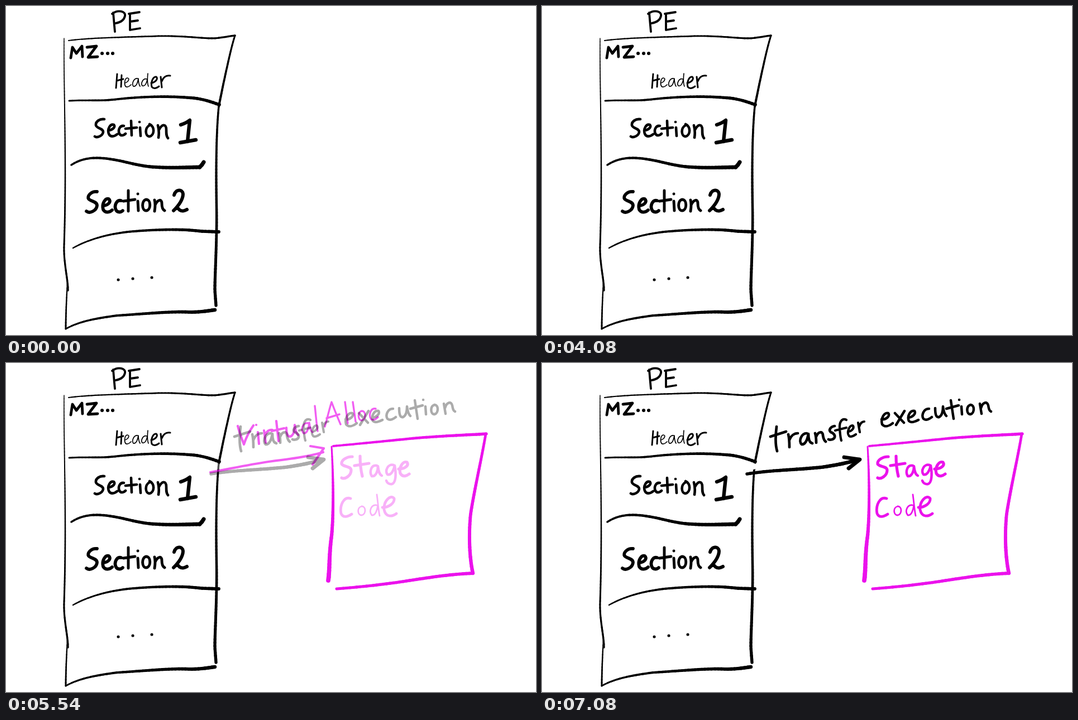
Recreate the animation shown at these times as an HTML page. Size 949 by 590 pixels, loop 7.12 s.

```html
<!DOCTYPE html>
<html lang="en">
<head>
<meta charset="utf-8">
<title>PE stage loading</title>
<style>
html, body { margin: 0; width: 100%; height: 100%; overflow: hidden; background: #fff; }
svg { display: block; width: 949px; height: 590px; }
path, line { fill: none; stroke-linecap: round; stroke-linejoin: round; }
g { stroke: #000; }
.pink { stroke: #eb12ec; }
.gap { stroke: #fff; }
</style>
</head>
<body>
<svg viewBox="0 0 949 590">
  <g id="file"></g>
  <g id="box" class="pink"></g>
  <g id="alloc" class="pink"></g>
  <g id="gap" class="gap"></g>
  <g id="run"></g>
  <g id="stage" class="pink"></g>
</svg>
<script>
const LOOP = 7120, ALLOC_AT = 4100, RUN_AT = 5450, FADE = 280;
const $ = id => document.getElementById(id);

function add(group, tag, attrs) {
  const el = document.createElementNS('http://www.w3.org/2000/svg', tag);
  for (const k in attrs) el.setAttribute(k, attrs[k]);
  $(group).append(el);
  return el;
}

// Pen stroke of even width
const pen = (group, width, ...ds) =>
  add(group, 'path', { d: ds.join(''), 'stroke-width': width });

// Brush stroke whose width runs from w0 to w1
function brush(group, w0, w1, d) {
  const guide = pen(group, 1, d), len = guide.getTotalLength();
  const n = Math.ceil(len / 6);
  let a = guide.getPointAtLength(0);
  for (let i = 1; i <= n; i++) {
    const b = guide.getPointAtLength(len * i / n);
    add(group, 'line', { x1: a.x, y1: a.y, x2: b.x, y2: b.y,
      'stroke-width': w0 + (w1 - w0) * i / n });
    a = b;
  }
  guide.remove();
}

// "PE"
pen('file', 3.8,
  'M192 12C193 24 194 36 195 46M190 14C200 6 215 9 213 18C211 27 202 30 196 31',
  'M222 14L222 43M220 14L239 11M222 28L236 26M222 43L240 40');
// File outline
brush('file', 2, 3.4, 'M112 62C150 57 210 56 270 54C320 53 345 58 372 58C388 57 398 54 410 53');
brush('file', 3, 4, 'M410 53C403 75 398 100 393 122C388 145 384 165 381 180');
brush('file', 3.4, 5.4, 'M381 180C376 230 376 300 377 360C378 420 374 480 374 510L376 537');
brush('file', 1.4, 3.4, 'M104 58C103 150 109 280 104 430C103 460 111 490 111 510');
brush('file', 2, 3, 'M110 495C108 530 107 560 107 579');
brush('file', 2.8, 6.4, 'M107 579C130 566 160 560 200 555C250 552 300 547 330 549C350 549 365 546 374 545');
// "MZ..."
pen('file', 4.8, 'M116 93L119 74L126 85L136 72L137 91M145 74L162 72L147 92L164 91');
pen('file', 6, 'M172 85h.1M182 85h.1M191 85h.1');
// "Header"
pen('file', 2.9, 'M199 122L197 147M207 124L206 145M198 134L210 131');
pen('file', 1.7,
  'M213 138C220 136 222 129 217 129C212 130 211 142 215 145C219 146 222 143 224 141',
  'M236 130C228 129 225 140 228 144C234 145 236 136 237 130C237 136 238 141 240 144',
  'M252 131C245 129 241 139 244 143C249 145 252 138 253 131M254 121C253 130 253 139 255 144');
pen('file', 3,
  'M260 138C268 137 273 130 269 127C263 126 259 137 261 145C265 150 270 147 274 144',
  'M277 127L279 146M279 135C282 127 287 124 294 125');
// Dividers
brush('file', 2.8, 5.6, 'M113 170C150 168 170 171 200 167C260 161 300 162 335 165C355 167 370 173 382 177');
brush('file', 3.4, 7, 'M117 285C140 270 165 271 190 275C220 280 240 288 270 289C300 291 330 289 348 289L354 280');
brush('file', 2.4, 5.8, 'M120 434C150 417 190 407 230 404C280 400 320 400 350 404L381 405');
// "Section 1"
pen('file', 4.6,
  'M176 203C168 202 160 207 161 214C163 220 174 219 174 226C173 233 163 237 159 234',
  'M183 223C190 223 197 217 193 213C187 211 181 220 184 229C187 236 194 234 199 230',
  'M211 215C204 214 200 222 203 229C206 234 211 232 214 229',
  'M224 206L225 232M214 220L234 218M240 218L241 233M239 208h.1',
  'M257 214C248 218 249 234 257 234C266 232 267 216 257 212',
  'M272 214C274 222 274 230 273 236M274 222C280 210 287 212 287 222C287 229 287 234 290 237');
pen('file', 6.4, 'M313 213C319 211 325 208 329 205L325 243M312 245L340 240');
// "Section 2"
pen('file', 5.8,
  'M163 333C152 332 145 341 148 346C152 351 163 350 163 358C162 367 150 373 144 368',
  'M175 358C184 357 189 350 184 346C178 344 171 354 174 365C178 372 186 370 190 366',
  'M206 349C198 347 193 358 197 366C200 371 206 370 209 367');
pen('file', 4.9,
  'M219 331L219 368M210 350L231 347M236 350L237 367M236 337h.1',
  'M251 347C242 349 243 367 251 367C260 366 260 347 251 347',
  'M266 348C268 356 267 362 266 368M267 357C272 346 279 346 279 354C279 361 280 365 284 367');
pen('file', 6, 'M301 339C304 328 316 328 317 337C317 348 307 360 300 367C305 361 308 362 311 366C316 369 320 367 324 365');
pen('file', 5, 'M201 491h.1M227 489h.1M261 487h.1');

// Allocated memory
brush('box', 3.8, 5.4, 'M586 149C640 144 680 140 730 135C790 130 830 129 860 127');
brush('box', 4.6, 6.4, 'M859 127C852 170 840 220 832 270C828 310 830 350 836 377');
brush('box', 5.8, 5, 'M836 377C790 379 750 386 710 392C670 398 630 402 592 405');
brush('box', 2.8, 7.8, 'M583 150C586 200 587 270 583 310C578 345 580 370 577 390');

// "VirtualAlloc"
pen('alloc', 4.2,
  'M415 113C418 125 423 138 426 146C430 133 436 122 443 112',
  'M451 124L453 145M448 111h.1M462 121L465 143M464 129C467 122 471 119 477 120',
  'M484 104L488 140M476 122L498 117',
  'M502 116C502 128 505 134 511 131C516 127 517 118 517 111C518 120 520 127 523 129');
pen('alloc', 3.4,
  'M541 108C531 106 527 120 533 126C540 127 542 115 543 107C544 115 545 122 549 124',
  'M553 77C555 95 556 110 558 122',
  'M571 114C575 100 579 82 583 70C588 84 594 98 599 110M574 99L597 92',
  'M607 70L612 108M621 70L626 105',
  'M637 86C629 88 630 103 637 103C645 101 645 86 637 86',
  'M662 82C652 80 649 95 654 101C658 103 663 100 666 97');
pen('alloc', 4.2, 'M366 196C400 190 430 183 470 177C510 172 540 168 568 160M545 149L569 153L549 182');

// "transfer execution"
pen('gap', 8, 'M380 184L379 187');
pen('run', 4.7,
  'M420 114C418 130 417 145 421 158M409 132L437 123',
  'M441 128C443 136 443 146 443 151M443 138C446 130 452 126 458 126',
  'M474 126C464 126 459 141 465 146C473 146 476 133 477 127C477 136 479 143 484 144',
  'M489 126C491 132 491 138 491 143M491 132C495 122 503 122 503 130C504 136 505 139 508 141',
  'M524 113C516 114 513 121 517 124C523 126 526 131 523 135C520 138 515 138 513 137');
pen('run', 4.2,
  'M545 102C537 98 532 106 533 118C534 128 534 133 536 139M525 121L545 116',
  'M549 123C556 122 560 115 556 112C550 112 545 125 550 131C554 134 559 130 562 128',
  'M566 107L569 124M568 114C570 108 573 105 577 105');
pen('run', 4.5,
  'M608 101C616 102 624 95 620 90C613 88 606 99 609 110C614 116 622 113 628 108',
  'M632 90L648 107M649 86L634 111',
  'M656 98C664 97 670 91 667 86C660 84 653 95 657 104C661 108 669 105 674 102',
  'M693 82C683 82 679 94 683 100C687 104 694 100 698 97',
  'M704 81C704 93 706 98 711 97C717 94 718 84 718 78C719 86 721 92 724 95',
  'M732 67L737 100M724 82L746 76M751 78L752 92M747 66h.1',
  'M767 75C759 78 760 92 767 92C775 90 775 75 767 75',
  'M784 73L787 91M786 81C789 70 797 68 799 76C800 82 801 86 804 87');
brush('run', 5.4, 6.6, 'M367 199C410 192 450 192 500 187C530 183 550 178 568 173');
pen('run', 6.8, 'M541 169L569 173L549 189');

// "Stage Code"
pen('stage', 5.2,
  'M620 168C610 168 600 174 601 181C604 187 617 184 618 192C618 203 606 209 601 206',
  'M634 167C634 185 636 195 638 203M624 184L650 180',
  'M703 190C714 190 722 184 718 178C711 175 703 187 706 198C711 206 718 202 722 199');
pen('stage', 4.5,
  'M664 184C654 182 650 195 655 203C663 204 666 192 666 185C667 193 668 200 673 202',
  'M694 183C684 180 678 193 683 200C690 202 694 192 696 184C699 200 698 215 691 217C685 218 682 214 681 211');
pen('stage', 4.8,
  'M617 243C605 239 597 255 600 270C604 279 613 275 619 271',
  'M674 259C686 259 696 251 695 243C689 235 676 247 677 263C680 277 691 276 699 270');
pen('stage', 2.8,
  'M637 257C628 259 629 273 637 273C645 271 645 257 637 257',
  'M664 255C654 253 649 266 655 273C662 274 665 262 666 254M664 236C666 250 667 265 669 274');

const ramp = (t, start) => Math.min(1, Math.max(0, (t - start) / FADE));

function draw(now) {
  const t = now % LOOP, alloc = ramp(t, ALLOC_AT), run = ramp(t, RUN_AT);
  $('box').style.opacity = alloc;
  $('alloc').style.opacity = alloc * (1 - run);
  for (const id of ['gap', 'run', 'stage']) $(id).style.opacity = run;
  requestAnimationFrame(draw);
}
draw(performance.now());
</script>
</body>
</html>
```
